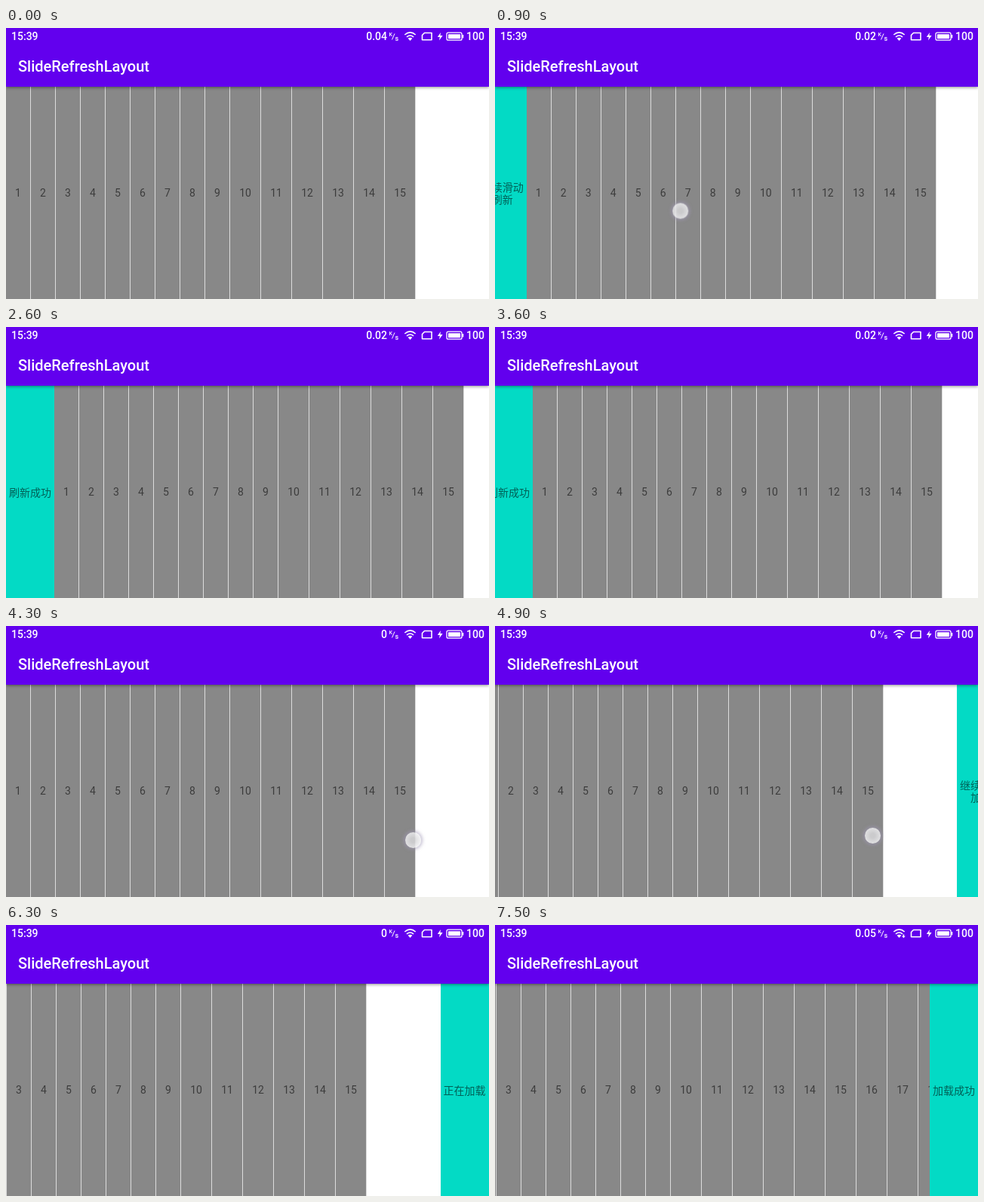
Recreate the animation shown at these times as an HTML page. Size 640x360 px, loop 8000 ms.

```html
<!DOCTYPE html>
<html lang="zh">
<head>
<meta charset="utf-8">
<title>SlideRefreshLayout</title>
<style>
@property --pull { syntax: "<length>"; inherits: true; initial-value: 0px; }

html, body { margin: 0; width: 100%; height: 100%; overflow: hidden; }

.stage, .stage * { animation: 8s step-end infinite; }
.stage {
  position: relative; width: 640px; height: 360px; overflow: hidden;
  background: #fff; font: 14px Roboto, sans-serif; animation-name: pull;
}

/* App bar */
.bar {
  position: absolute; inset: 0 0 auto; height: 78px; z-index: 2;
  background: #6200ee; color: #fff; font-weight: 500;
  box-shadow: 0 1px 4px rgba(0, 0, 0, .45);
}
.bar svg { position: absolute; left: 0; top: 0; }
.bar span { position: absolute; top: 3px; line-height: 16px; }
.clock { left: 7px; }
.level { left: 610px; }
.bar .title { left: 16px; top: 39px; font-size: 20px; line-height: 24px; }
.speed { position: absolute; left: 460px; top: 3px; width: 45px; height: 16px; overflow: hidden; }
.speed div { position: relative; text-align: right; line-height: 16px; animation-name: speed; }
.arrow { animation-name: arrow; }

/* Content */
.list, .panel { position: absolute; top: 78px; height: 282px; color: rgba(0, 0, 0, .56); }
.list { left: var(--pull); display: flex; }
.item {
  box-sizing: border-box; width: 33px; flex: none; line-height: 282px;
  text-align: center; background: #888; border-right: 1px solid #dcdcdc;
}
.item.wide { width: 41px; }
.item.added { animation-name: added; }

/* A panel sticks to the list until fully shown, then centres in the gap */
.panel { width: 64px; overflow: hidden; background: #03dac5; }
.head { --over: calc(var(--pull) - 64px); left: min(var(--over), var(--over) / 2); }
.foot { --over: calc(-1 * var(--pull) - 64px); left: calc(576px - min(var(--over), var(--over) / 2)); }
.labels { position: relative; }
.labels p {
  margin: 0; height: 282px; display: flex; align-items: center; justify-content: center;
  text-align: center; white-space: nowrap;
  font: 14px/16px "Noto Sans CJK SC", "Noto Sans CJK", sans-serif;
}
.head .labels { animation-name: headLabels; }
.foot .labels { animation-name: footLabels; }

.finger {
  position: absolute; left: -10.5px; top: -10.5px; width: 21px; height: 21px; z-index: 3;
  border-radius: 50%; background: radial-gradient(rgba(215, 215, 217, .85) 20%, rgba(240, 240, 242, .85) 70%);
  box-shadow: 0 0 4px 2px rgba(160, 152, 182, .6); animation-name: finger;
}

/* 1.25% is one 100 ms tick */
@keyframes pull {
  0% { --pull: 0px; }
  6.25% { --pull: 0px; animation-timing-function: steps(9); }
  17.5% { --pull: 94px; }
  18.75% { --pull: 98px; }
  20% { --pull: 88px; }
  21.25% { --pull: 72px; }
  22.5% { --pull: 66px; }
  23.75% { --pull: 64px; }
  45% { --pull: 50px; }
  46.25% { --pull: 24px; }
  47.5% { --pull: 7px; }
  48.75% { --pull: 0px; }
  53.75% { --pull: 0px; animation-timing-function: steps(6); }
  61.25% { --pull: -28px; animation-timing-function: steps(9); }
  72.5% { --pull: -78px; animation-timing-function: steps(2); }
  75% { --pull: -82px; }
  76.25% { --pull: -77px; }
  77.5% { --pull: -69px; }
  78.75% { --pull: -65px; }
  80%, 100% { --pull: -64px; }
}
@keyframes finger {
  0% { opacity: 0; transform: translate(183px, 246px); }
  6.25% { opacity: 1; transform: translate(183px, 246px); animation-timing-function: steps(9); }
  17.5% { opacity: 1; transform: translate(323px, 238px); }
  18.75% { opacity: 1; transform: translate(329px, 238px); }
  20% { opacity: 0; transform: translate(329px, 238px); }
  53.75% { opacity: 1; transform: translate(539px, 284px); animation-timing-function: steps(6); }
  61.25% { opacity: 1; transform: translate(500px, 278px); animation-timing-function: steps(9); }
  72.5% { opacity: 1; transform: translate(425px, 278px); animation-timing-function: steps(2); }
  75% { opacity: 1; transform: translate(418px, 278px); }
  76.25%, 100% { opacity: 0; transform: translate(418px, 278px); }
}
@keyframes headLabels {
  0% { top: 0; }
  15% { top: -282px; }
  20% { top: -564px; }
  32.5%, 100% { top: -846px; }
}
@keyframes footLabels {
  0% { top: 0; }
  70% { top: -282px; }
  76.25% { top: -564px; }
  90%, 100% { top: -846px; }
}
@keyframes speed {
  0% { top: 0; }
  8.75% { top: -16px; }
  46.25% { top: -32px; }
  83.75%, 100% { top: -48px; }
}
@keyframes arrow {
  0% { opacity: 0; }
  83.75%, 100% { opacity: 1; }
}
@keyframes added {
  0% { opacity: 0; }
  90% { opacity: .25; }
  91.25% { opacity: .6; }
  92.5% { opacity: .9; }
  93.75%, 100% { opacity: 1; }
}
</style>
</head>
<body>
<div class="stage">
  <div class="bar">
    <span class="clock">15:39</span>
    <div class="speed"><div>0.04<br>0.02<br>0<br>0.05</div></div>
    <svg width="640" height="24" fill="#fff">
      <text x="507.5" y="11" font-size="7">K</text>
      <text x="515.5" y="16.5" font-size="9">s</text>
      <g fill="none" stroke="#fff" stroke-width="1.6">
        <path d="M511.5 15.5L515 7.5" stroke-width="1"/>
        <path d="M528.3 9Q535.5 2.6 542.7 9M530.9 12Q535.5 8 540.1 12"/>
        <path d="M554.5 6.5H564V15.7H551.5V9.5Z" stroke-linejoin="round"/>
        <rect x="584" y="6.2" width="20" height="10" rx="2" stroke-width="1.3"/>
      </g>
      <path d="M532.6 13.8Q535.5 11.6 538.4 13.8L535.5 17Z"/>
      <path class="arrow" d="M540.6 12.5h1.6v2.2h1.6l-2.4 2.6-2.4-2.6h1.6z"/>
      <path d="M576 6L571.8 12H574.8L574 16.5L578.6 10H575.4Z"/>
      <rect x="586" y="8.2" width="16" height="6" rx=".5"/>
      <rect x="604.6" y="9" width="1.6" height="4.4" rx=".6"/>
    </svg>
    <span class="level">100</span>
    <span class="title">SlideRefreshLayout</span>
  </div>
  <div class="list"></div>
  <div class="panel head">
    <div class="labels">
      <p>继续滑动<br>刷新</p><p>松开开始<br>刷新</p><p>正在刷新</p><p>刷新成功</p>
    </div>
  </div>
  <div class="panel foot">
    <div class="labels">
      <p>继续滑动<br>加载</p><p>松开开始<br>加载</p><p>正在加载</p><p>加载成功</p>
    </div>
  </div>
  <div class="finger"></div>
</div>
<script>
const list = document.querySelector(".list");
for (let n = 1; n <= 18; n++) {
  const item = document.createElement("div");
  item.className = "item" + (n > 9 ? " wide" : "") + (n > 15 ? " added" : "");
  item.textContent = n;
  list.append(item);
}
</script>
</body>
</html>
```
